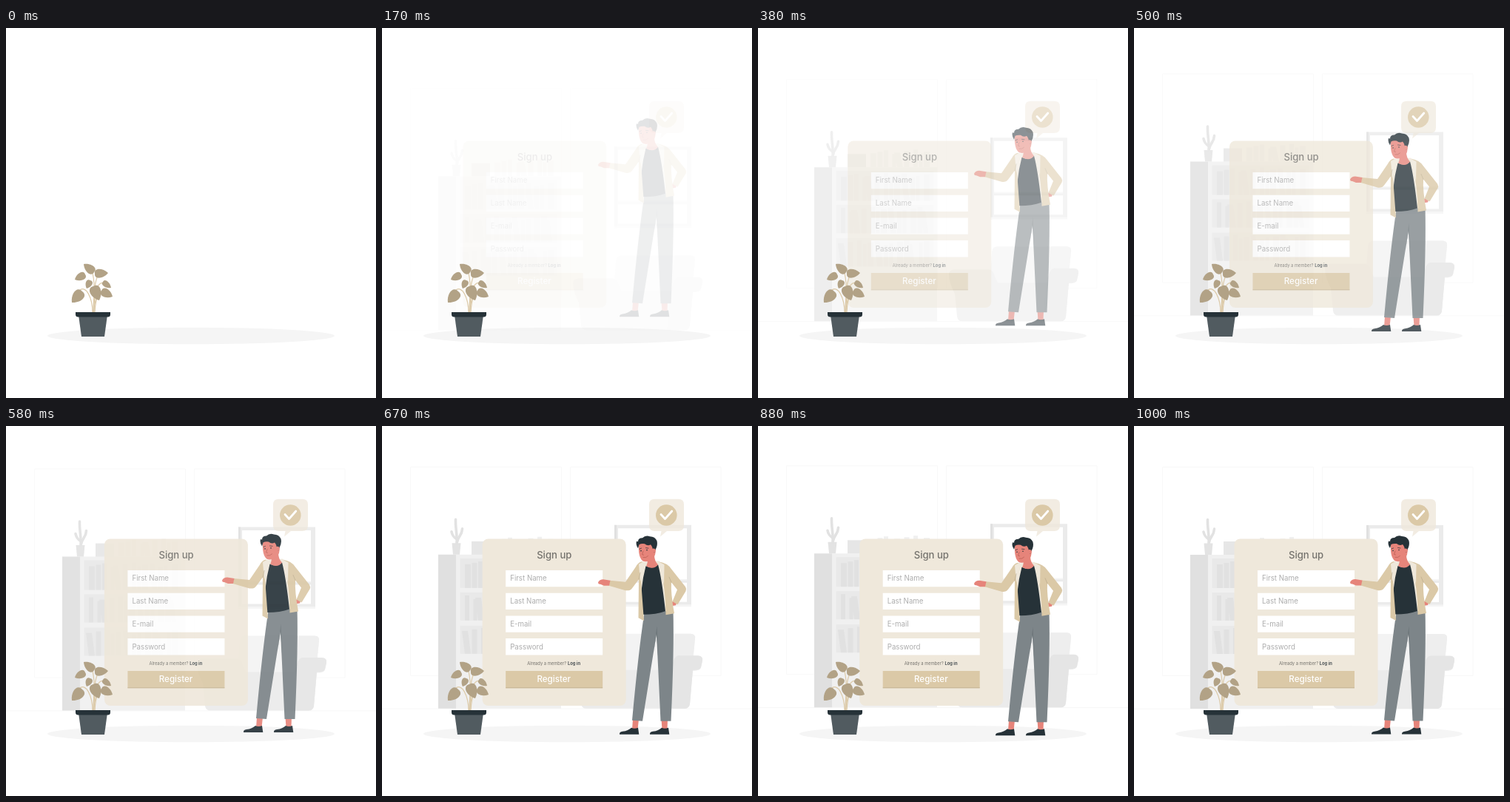
An HTML page that plays this animation: 500 px wide and 500 px high, repeating every 1040 ms.

```html
<!DOCTYPE html>
<html lang="en">
<head>
<meta charset="utf-8">
<title>Sign up</title>
<style>
  html, body { margin: 0; width: 100%; height: 100%; overflow: hidden; background: #fff; }
  svg { display: block; width: 100%; height: 100%; font-family: Inter, "Open Sans", sans-serif; }
  .beige { fill: #dbc9a7; }
  .cream { fill: #efe8db; }
  .dark { fill: #263238; }
  .skin { fill: #e6847a; }
  .line { fill: none; stroke-linecap: round; stroke-linejoin: round; }
  .label { font-size: 9.7px; fill: #adadad; }
</style>
</head>
<body>
<svg viewBox="0 0 500 500">
  <ellipse cx="250" cy="416" rx="194" ry="11.3" fill="#f5f5f5"/>

  <g id="room">
    <g class="line" stroke="#f8f8f8">
      <rect x="39" y="55.5" width="203.5" height="282"/>
      <rect x="255" y="55.5" width="203" height="282"/>
      <path d="M0 382.3H500" stroke="#f3f3f3" stroke-width=".7"/>
    </g>

    <!-- bookcase -->
    <path d="M100 174H242V382H100Z" fill="#f0f0f0"/>
    <path d="M76 174H100V382H76Z" fill="#e0e0e0"/>
    <g id="shelves"></g>
    <path d="M121 156H146V174H121Z" fill="#e6e6e6"/>
    <g id="topBooks" fill="#f0f0f0"></g>
    <path d="M94.5 158.5H106.5L105 174H96Z" fill="#e3e3e3"/>
    <g class="line" stroke="#e2e2e2" stroke-width="3.6">
      <path d="M101 159C102 148 99 138 99.500 126.500"/>
      <path d="M101 153C98 151 95 149 94 143"/>
      <path d="M101.500 157C103 148 108 149 108.500 139"/>
    </g>

    <!-- window -->
    <path d="M314 134H418V244H314Z" fill="#ebebeb"/>
    <path d="M314 134H317V244H314Z" fill="#e0e0e0"/>
    <path d="M319 138.500H412V207.500H319ZM319 212H412V238H319Z" fill="#fff"/>
    <path d="M319 207.500H412V209H319ZM314 241.500H418V244H314Z" fill="#f5f5f5"/>

    <!-- sofa -->
    <path d="M323 281H417Q424 281 423 288L417 350H312L316 288Q317 281 323 281Z" fill="#f3f3f3"/>
    <path d="M396 281H417Q424 281 423 288L420 318H391Z" fill="#eee"/>
    <path d="M266 312H312Q319 313 320 322L324 330H397Q395 311 402 311H427Q434 311 433 318L431 327Q430 331 420 331L416 376Q415 382 409 382H276Q270 382 269 376L266 345Q258 330 258 319Q258 312 266 312Z" fill="#ebebeb"/>
    <path d="M401 310.500H427Q434 311 433 317L431 326Q430 330 420 330L416 376Q415 382 409 382H385L390 331Q394 310 401 310.500Z" fill="#e5e5e5"/>
  </g>

  <g id="bubble">
    <path class="cream" fill-opacity=".8" d="M368.500 98.700H400.500Q408 98.700 408 106V134.500Q408 142 400.500 142H385L376 149.500L377.500 142H368.500Q361 142 361 134.500V106Q361 98.700 368.500 98.700Z"/>
    <circle class="beige" cx="384.300" cy="120.500" r="14.300"/>
    <path class="line" stroke="#fff" stroke-width="2.800" d="M377 119.500L382.500 125.500L391.800 115"/>
  </g>

  <g id="form">
    <rect class="cream" x="135.500" y="152.500" width="194" height="225.500" rx="8"/>
    <text x="209" y="178.700" font-size="13.100" font-weight="450" fill="#74726d">Sign up</text>
    <g id="fields"></g>
    <text x="196" y="322.800" font-size="5.800" fill="#74726d">Already a member? <tspan font-weight="700" fill="#4a5155">Log in</tspan></text>
    <path class="beige" d="M167 331H298V354.200H167Z"/>
    <path fill="#c4b495" d="M167 353.200H298V354.200H167Z"/>
    <text x="209.300" y="345.600" font-size="11.600" font-weight="500" fill="#fff">Register</text>
  </g>

  <g id="plant">
    <g class="line" stroke="#dccaa9" stroke-width="1.200">
      <path d="M117 385C117 365 108 346 99 355"/>
      <path d="M117.500 385C119 362 121 345 116 327"/>
      <path d="M119 385C119 360 119 340 126 332"/>
      <path d="M118.500 385C119 355 124 341 134 345"/>
      <path d="M118 385C119 372 122 368 122 360"/>
      <path d="M120 385C121 360 128 352 134 356"/>
    </g>
    <g id="leaves" fill="#b2a286"></g>
    <path fill="#515b60" d="M98 388H137L133 417H102Z"/>
    <path class="dark" d="M94 384H141V387Q141 390.500 137.500 390.500H97.500Q94 390.500 94 387Z"/>
  </g>

  <g id="man">
    <!-- legs -->
    <path class="skin" d="M339 396H347L345.500 410H338ZM377.500 396H386L385.500 410H378.500Z"/>
    <path id="shoe" class="dark" d="M337 407.500Q341 409.500 346 407.500L347.300 416.500H321Q320.500 413.500 325 412.700Q333 411.500 337 407.500Z"/>
    <use href="#shoe" x="41"/>
    <path fill="#7d8589" d="M354.500 252L393.500 249Q395 300 390.500 398.500H376.500L371 280L352 398.500L338 397.500Q346.500 305 354.500 252Z"/>
    <path fill="#6c7579" d="M371.500 270L373.500 318L371 280L367 306Z"/>

    <!-- torso -->
    <path class="cream" d="M352 184L374 182L386 212L391 248L350 254L347 214Z"/>
    <path class="dark" d="M356.500 189Q366 194 373 187Q378 205 383 250Q369 255 350 254.500Q348 221 356.500 189Z"/>
    <path class="skin" d="M358 176L368 174Q368 182 373 187Q367 195 357 189Q360 184 358 176Z"/>
    <path class="beige" d="M351 183Q346 184 343 190L329 210.500L308 208.500L306.500 215.500L329 222Q335 223 338 219L347 207L346.500 259L354 263L350.500 216Q349 200 354 184Z"/>
    <path class="skin" d="M308.500 208.500L299 207Q294 207 292 211Q292 214 295 213.500L300 215.500L307 215.500Z"/>
    <path class="skin" d="M389 240.500L394 235.500L399 236.500L397 242L391 243Z"/>
    <path class="beige" d="M374 183Q386 185 391 193L410 217Q412 220 410.500 223L399.500 241L392.500 237L399 221L391 211Q390 226 395 253L383.500 255Q384 220 374 183Z"/>
    <path class="cream" d="M373.500 183L381.500 187L381 214ZM353 183L347 186.500L349 210L356.500 188Z"/>
    <path class="line" stroke="#b9a98b" stroke-width=".7" d="M391 211L388 204M347 207L349 198"/>

    <!-- head -->
    <path class="skin" d="M347 160Q353 154 368 157Q372 171 367 178Q361 185 353 182.500Q346 178 347 160Z"/>
    <path class="dark" d="M346 165Q342.500 160 344 155.500L346 156Q346 151 352 151Q356 147 362 149Q369 149 371.500 155Q373 161 369.500 167L368 171L366 169Q366 163 363 160Q359 162.500 355 159Q350 158.500 347.500 160Z"/>
    <circle class="skin" cx="367" cy="168" r="2.600"/>
    <circle class="dark" cx="350" cy="168.500" r=".8"/>
    <circle class="dark" cx="358" cy="167.500" r=".8"/>
    <path class="line" stroke="#263238" stroke-width=".7" d="M348 166L350.500 165M356.500 164.500L360 165"/>
    <path class="line" stroke="#b5594f" stroke-width=".7" d="M353 169L351.500 173.500L353.500 174M353 177.500Q357 178.500 359.500 175.500"/>
  </g>
</svg>

<script>
const $ = id => document.getElementById(id);

// A row of books standing on a base line; every fifth one leans.
function books(x, end, base, height, seed) {
  let d = '';
  for (let i = seed; x < end - 6; i++) {
    const w = 5 + (i * 3) % 4, h = height - (i * 5) % 7, lean = i % 5 ? 0 : -4;
    d += `M${x} ${base}h${w}l${lean} ${-h}h${-w}Z`;
    x += w + 1.5 + (i % 3 ? 0 : 4);
  }
  return `<path d="${d}"/>`;
}

// A leaf, broad at its base and pointed at its tip.
function leaf([x, y, tx, ty, w]) {
  const dx = tx - x, dy = ty - y, len = Math.hypot(dx, dy);
  const nx = -dy / len * w, ny = dx / len * w;
  const at = (along, side) => `${x + dx * along + nx * side} ${y + dy * along + ny * side}`;
  return `<path d="M${at(0, 0)}C${at(-.08, 1)} ${at(.6, 1)} ${at(1, 0)}C${at(.6, -1)} ${at(-.08, -1)} ${at(0, 0)}Z"/>`;
}

$('shelves').innerHTML = [[179, 40, 1], [225, 38, 3], [270, 38, 5]].map(([y, h, seed]) =>
  `<path d="M105.500 ${y}H237V${y + h}H105.500Z" fill="#e9e9e9"/><g fill="#e1e1e1">${books(112, 237, y + h, h - 3, seed)}</g>`
).join('');
$('topBooks').innerHTML = books(152, 236, 174, 24, 1);

$('fields').innerHTML = ['First Name', 'Last Name', 'E-mail', 'Password'].map((label, i) => {
  const y = 195 + i * 30.7;
  return `<path d="M167 ${y}h131v22.300h-131Z" fill="#fff"/><text class="label" x="173" y="${y + 14.4}">${label}</text>`;
}).join('');

$('leaves').innerHTML = [
  [119, 330, 105, 319, 7.8], [107, 333, 93, 340, 7], [120, 332, 138, 331, 8],
  [131, 343, 142, 351, 5.5], [114, 341, 109, 352, 6], [103, 356, 89, 371, 10],
  [118, 349, 126, 368, 10], [129, 355, 144, 363, 7.8]
].map(leaf).join('');

const LOOP = 1040, FPS = 24, HIDDEN = 4, LEAD = .02, SLIDE = 30;
const cubic = (a, b, s) => 3 * a * s * (1 - s) ** 2 + 3 * b * s * s * (1 - s) + s ** 3;

// cubic-bezier(.36, -.01, .5, 1.38)
function ease(x) {
  if (x >= 1) return 1;
  let lo = 0, hi = 1;
  for (let i = 0; i < 24; i++) {
    const mid = (lo + hi) / 2;
    if (cubic(.36, .5, mid) < x) lo = mid; else hi = mid;
  }
  return cubic(-.01, 1.38, lo);
}

const parts = [
  { el: $('room'), x: 0, y: 1 },
  { el: $('bubble'), x: 0, y: 0 },
  { el: $('form'), x: -1, y: 0 },
  { el: $('man'), x: 0, y: -1 }
];

function draw(ms) {
  // A few ms of slack for step times rounded to 10 ms.
  const step = Math.floor((ms % LOOP + 4) * FPS / 1000);
  const p = step < HIDDEN ? 0 : ease(step / FPS + LEAD);
  const gap = SLIDE * (1 - p);
  for (const { el, x, y } of parts) {
    el.setAttribute('transform', `translate(${x * gap} ${y * gap})`);
    el.setAttribute('opacity', Math.min(1, Math.max(0, p)));
  }
}

const start = performance.now();
function tick() {
  draw(performance.now() - start);
  requestAnimationFrame(tick);
}
tick();
</script>
</body>
</html>
```
